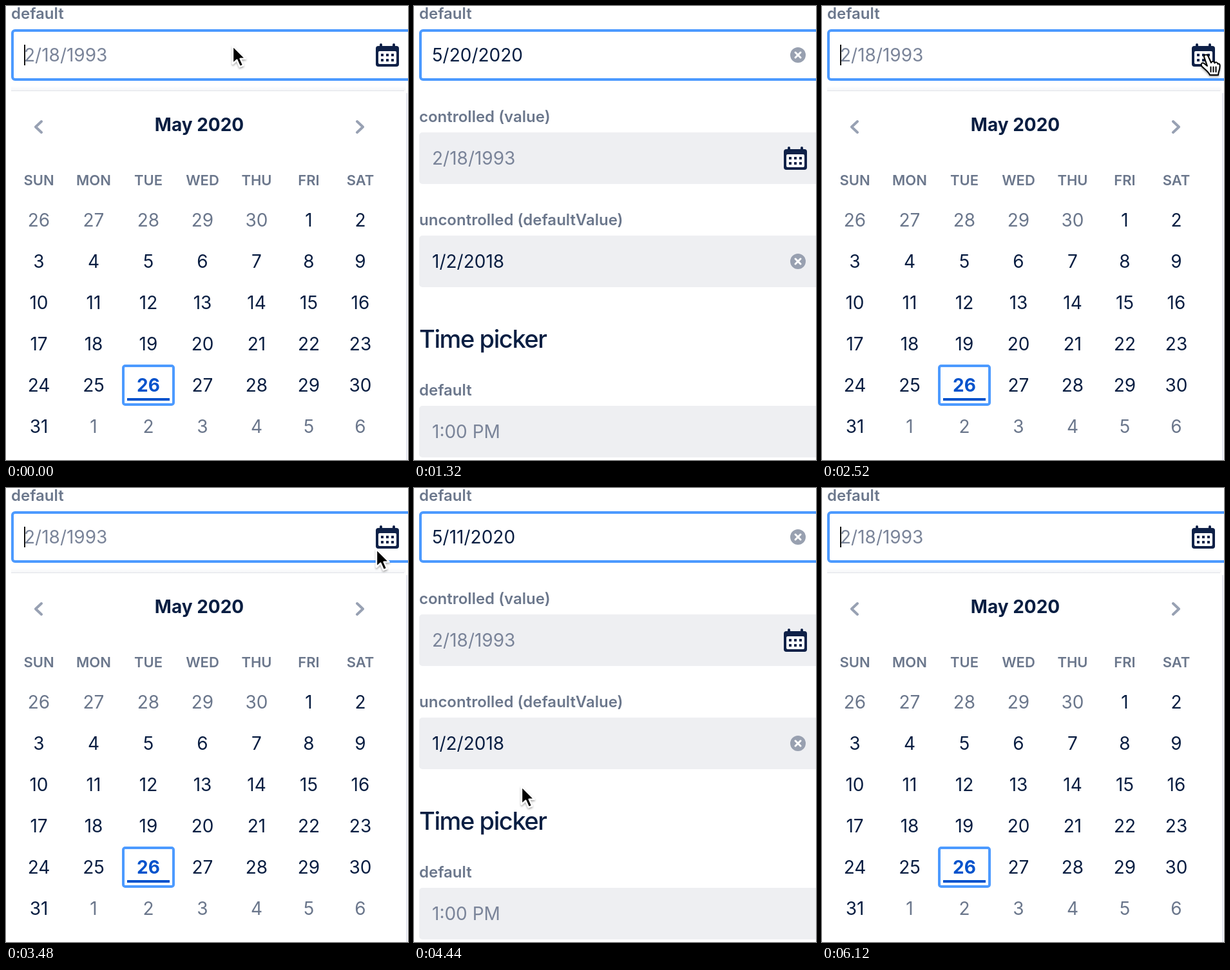
Write an HTML page that moves like this. It is 624 by 704 pixels and loops after 6.18 s.

```html
<!DOCTYPE html>
<html lang="en">
<head>
<meta charset="utf-8">
<title>Date picker</title>
<style>
  html, body { margin: 0; width: 100%; height: 100%; overflow: hidden; background: #fff; }
  svg { display: block; width: 100%; height: 100%; }
  text { font-family: Inter, "Open Sans", sans-serif; font-size: 28px; fill: #091e42; }
  .label { font-size: 24px; font-weight: 600; fill: #6b778c; }
  .hint { fill: #7a8499; }
  .mid { text-anchor: middle; }
  .week { font-size: 22px; font-weight: 600; fill: #6b778c; }
  .month { font-weight: 700; }
  .other { fill: #6b778c; }
  .today { font-weight: 700; fill: #0052cc; }
  .over { fill: #42526e; }
  .heading { font-size: 38px; font-weight: 500; letter-spacing: -1.4px; }
  .field { fill: #eeeff2; }
  .chevron { fill: none; stroke: #98a1b3; stroke-width: 4; stroke-linecap: round; stroke-linejoin: round; }
</style>
</head>
<body>
<svg id="stage" viewBox="0 0 624 704">
  <defs>
    <filter id="soft" x="-40%" y="-40%" width="190%" height="190%">
      <feDropShadow dx="0" dy="2" stdDeviation="1.6" flood-opacity=".35"/>
    </filter>
    <linearGradient id="edge" x2="0" y2="1">
      <stop offset="0" stop-color="#fff"/>
      <stop offset="1" stop-color="#f5f6f8"/>
    </linearGradient>
    <g id="date">
      <rect x="574" y="62" width="36" height="32" rx="4" fill="#0f2148"/>
      <path d="M582 60V66M602 60V66" stroke="#0f2148" stroke-width="4" stroke-linecap="round"/>
      <rect x="578" y="70" width="28" height="20" rx="2" fill="#fff"/>
      <path d="M582 76H602M582 84H602" stroke="#0f2148" stroke-width="4" stroke-dasharray="4"/>
    </g>
    <g id="clear">
      <circle cx="596" cy="76" r="12"/>
      <path d="M592 72L600 80M600 72L592 80" stroke="#fff" stroke-width="3" stroke-linecap="round"/>
    </g>
  </defs>
  <rect width="624" height="704" fill="#fff"/>
  <text class="label" x="8" y="20">default</text>

  <g id="page">
    <text class="label" x="8" y="180">controlled (value)</text>
    <rect class="field" x="8" y="196" width="640" height="80" rx="5"/>
    <text class="hint" x="28" y="246">2/18/1993</text>
    <use href="#date" y="160"/>
    <text class="label" x="8" y="340">uncontrolled (defaultValue)</text>
    <rect class="field" x="8" y="356" width="640" height="80" rx="5"/>
    <text x="28" y="406">1/2/2018</text>
    <use href="#clear" y="320" fill="#98a0b0"/>
    <text class="heading" x="8" y="530">Time picker</text>
    <text class="label" x="8" y="604">default</text>
    <rect class="field" x="8" y="620" width="640" height="80" rx="5"/>
    <text class="hint" x="28" y="670">1:00 PM</text>
  </g>

  <g id="calendar">
    <rect x="8" y="124" width="612" height="7" fill="url(#edge)"/>
    <path d="M8 131.5H618" stroke="#e1e3e8"/>
    <path d="M622 135V704" stroke="#e4e6ef" stroke-width="2"/>
    <path class="chevron" d="M55 179L46 187.5L55 196M545 179L554 187.5L545 196"/>
    <text class="mid month" x="300" y="194">May 2020</text>
    <rect id="hover" height="64" rx="5" fill="#dfe4ee"/>
    <g id="days"></g>
    <rect x="182" y="558" width="78" height="60" rx="3" fill="none" stroke="#4c9aff" stroke-width="4"/>
    <rect x="188" y="608" width="66" height="4" fill="#0052cc"/>
  </g>

  <rect x="10" y="38" width="640" height="76" rx="4" fill="#fff" stroke="#4c9aff" stroke-width="4"/>
  <text id="value" x="28" y="86"></text>
  <use id="dateIcon" href="#date"/>
  <use id="clearIcon" href="#clear"/>
  <rect id="caret" x="28" y="60" width="2" height="32" fill="#111"/>

  <g id="cursor" filter="url(#soft)">
    <path id="arrow" d="M0 0V27.5L6.3 21.6L11 32L16.2 29.8L11.6 19.6H19.8Z"
      fill="#000" stroke="#fff" stroke-width="2.4" stroke-linejoin="round"/>
    <g id="hand" stroke="#000" stroke-width="2" stroke-linejoin="round" stroke-linecap="round">
      <path fill="#fff" d="M-4 2.5C-4-1 1-1.5 2.5 2L7 12C8 9 12 9.500 12.500 12.500C14 10.500 17 11 17.500 14C19.500 12.500 21 14.500 20.500 18C20.500 24 18 26 18 31H5C3 26-2 23-7 18C-10 14-7 11-4 13L1 17Z"/>
      <path fill="none" d="M6.500 18.500V26M10.500 18.500V26M14.500 18.500V26"/>
    </g>
  </g>
</svg>
<script>
const LOOP = 6180, STEP = 60;
const SVG = "http://www.w3.org/2000/svg";
const el = id => document.getElementById(id);
const show = (id, on) => el(id).setAttribute("display", on ? "inline" : "none");

const centers = [51, 136, 221, 305, 389, 470, 550];
const edges = [8, 92, 180, 262, 348, 430, 510, 592];
const TOP = 300, ROW = 64;

// Pointer stops: time, x, y
const stops = [
  [0, 352, 62], [300, 430, 330], [540, 335, 560], [660, 320, 520],
  [1380, 322, 518], [1860, 594, 76], [2400, 597, 76], [3420, 597, 76],
  [3480, 575, 95], [3960, 175, 470], [4080, 167, 463], [4740, 167, 463],
  [5100, 594, 73], [LOOP, 594, 73]
];
const pointerOn = [[0, 1020], [1380, 2880], [3480, 5640]];
const caretOn = [[0, 120], [600, 960], [2400, 2880], [3420, 3900], [5220, 5640], [6120, LOOP]];
const picked = [[960, 2400, "5/20/2020"], [4320, 5220, "5/11/2020"]];

const within = (list, t) => list.find(([from, to]) => t >= from && t < to);

function addText(str, x, y, cls) {
  const node = document.createElementNS(SVG, "text");
  node.setAttribute("x", x);
  node.setAttribute("y", y);
  node.setAttribute("class", "mid " + cls);
  node.textContent = str;
  el("days").append(node);
  return node;
}

["SUN", "MON", "TUE", "WED", "THU", "FRI", "SAT"].forEach((d, i) => addText(d, centers[i], 278, "week"));

const cells = Array.from({ length: 42 }, (_, i) => {
  const day = i - 4;
  const num = day < 1 ? day + 30 : day > 31 ? day - 31 : day;
  const cls = day < 1 || day > 31 ? "other" : day === 26 ? "today" : "";
  return addText(num, centers[i % 7], TOP + 42 + ROW * Math.floor(i / 7), cls);
});

function pointerAt(t) {
  const i = stops.findIndex((s, k) => k && t < s[0]);
  const [t0, x0, y0] = stops[i - 1], [t1, x1, y1] = stops[i];
  const p = (t - t0) / (t1 - t0), e = p * p * (3 - 2 * p);
  return [x0 + (x1 - x0) * e, y0 + (y1 - y0) * e];
}

function cellAt(x, y) {
  const row = Math.floor((y - TOP) / ROW);
  const col = edges.findIndex((left, i) => x >= left && x < edges[i + 1]);
  return row < 0 || row > 5 || col < 0 ? -1 : row * 7 + col;
}

function draw(t) {
  const value = within(picked, t), open = !value;
  const visible = !!within(pointerOn, t);
  const [x, y] = pointerAt(t);
  const cell = open && visible ? cellAt(x, y) : -1;
  const onIcon = visible && Math.hypot(x - 596, y - 76) < 16;
  const hand = onIcon || (cell >= 0 && t > 660);

  show("page", !open);
  show("calendar", open);
  show("dateIcon", open);
  show("clearIcon", !open);
  show("caret", !!within(caretOn, t));
  show("cursor", visible);
  show("arrow", !hand);
  show("hand", hand);
  show("hover", cell >= 0);

  el("value").textContent = open ? "2/18/1993" : value[2];
  el("value").setAttribute("class", open ? "hint" : "");
  el("clearIcon").setAttribute("fill", onIcon ? "#3c4760" : "#98a0b0");
  el("cursor").setAttribute("transform", `translate(${x.toFixed(1)} ${y.toFixed(1)})`);

  cells.forEach((c, i) => c.classList.toggle("over", i === cell));
  if (cell >= 0) {
    const col = cell % 7;
    el("hover").setAttribute("x", edges[col]);
    el("hover").setAttribute("y", TOP + ROW * Math.floor(cell / 7));
    el("hover").setAttribute("width", edges[col + 1] - edges[col]);
  }
}

const start = performance.now();
function tick(now) {
  const t = Math.max(0, now - start) % LOOP;
  draw(Math.floor(t / STEP) * STEP);
  requestAnimationFrame(tick);
}
draw(0);
requestAnimationFrame(tick);
</script>
</body>
</html>
```
